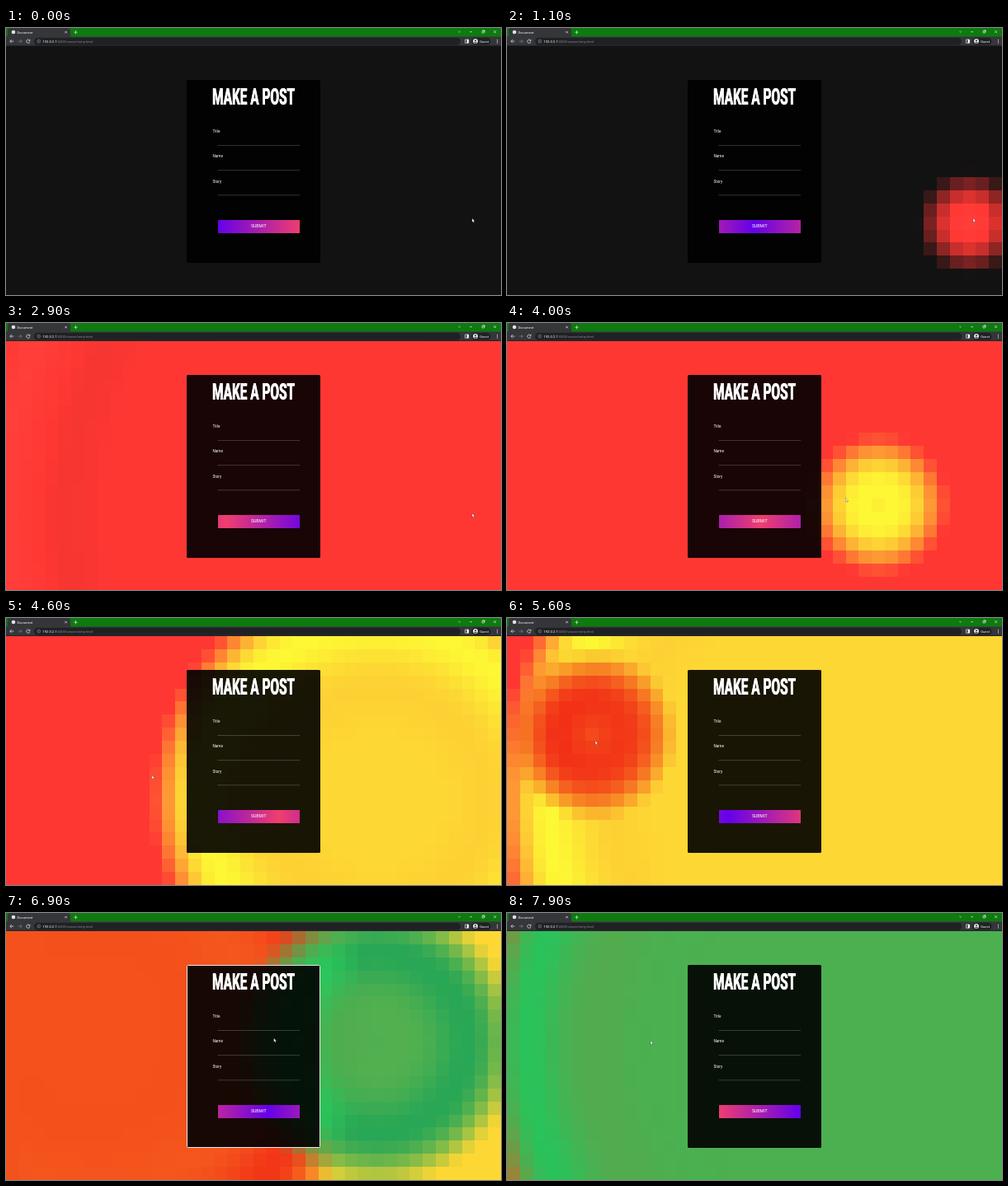
An HTML page with a canvas for the animation above (8000 ms loop, 600 px wide and 324 px high).

```html
<!DOCTYPE html>
<html lang="en">
<head>
<meta charset="utf-8">
<title>Document</title>
<style>
  html, body { margin: 0; width: 100%; height: 100%; overflow: hidden; background: #131213; }
  .stage { position: relative; width: 600px; height: 324px; overflow: hidden; font-family: Roboto, "Liberation Sans", sans-serif; }
  .stage > * { position: absolute; left: 0; top: 0; }
  .stage > .form {
    left: 219px; top: 62.5px; width: 162px; height: 222px; box-sizing: border-box;
    border-radius: 1.5px; background: rgb(0 0 0 / .9);
  }
  .form.hover { border: 1px solid #e8e8e8; }
  .stage > h1 {
    left: 250.1px; top: 70.4px; margin: 0; color: #fff;
    font-size: 28px; font-weight: 700; line-height: 1; white-space: nowrap;
    transform: scaleX(.55); transform-origin: 0 0;
    text-shadow: .6px 0 #fff, -.6px 0 #fff;
  }
  .stage > .submit {
    left: 256.5px; top: 233px; width: 99.5px; height: 15.5px; border-radius: .5px;
    background: linear-gradient(90deg, #6600ea, #f03e6e, #6600ea) 0 0 / 200px 100%;
    color: #fff; font-size: 5.2px; line-height: 15.5px; text-align: center;
  }
  svg { font-size: 4.7px; }
  .fine { font-size: 4.1px; }
  .line { fill: none; stroke: #e4e5e7; stroke-width: .7; }
</style>
</head>
<body>
<div class="stage">
  <canvas width="600" height="324"></canvas>
  <div class="form"></div>
  <h1>MAKE A POST</h1>
  <div class="submit">SUBMIT</div>
  <svg width="600" height="324" viewBox="0 0 600 324" fill="#fff">
    <!-- browser bar -->
    <rect width="600" height="11" fill="#0e7a10"/>
    <path d="M0 11Q2 11 2 9V3Q2 0 5 0H75Q78 0 78 3V9Q78 11 80 11Z" fill="#35363a"/>
    <rect y="10.5" width="600" height="11" fill="#35363a"/>
    <rect y="21.3" width="600" height=".7" fill="#222326"/>
    <rect x="34" y="11.7" width="517" height="9" rx="4.5" fill="#202124"/>
    <circle cx="9" cy="5" r="2.3" fill="#dfe1e5"/>
    <path class="line" d="M71.4 3.9l2.4 2.4m0-2.4l-2.4 2.4M82.4 5.2h4.2m-2.1-2.1v4.2"/>
    <path class="line" d="M548.4 4l1.2 1.2L550.8 4M562 4.7h3M577 3.6h2.4V6H577zM578 3.6v-.8h2.2V5h-.8M591.2 3.2l2.8 2.8m0-2.8l-2.8 2.8"/>
    <path class="line" d="M9.4 16.1H4.8m2.1-2.1l-2.1 2.1 2.1 2.1"/>
    <path class="line" stroke-opacity=".4" d="M14.6 16.1h4.6m-2.1-2.1l2.1 2.1-2.1 2.1"/>
    <path class="line" d="M28.4 14.8a2.1 2.1 0 1 0 .5 1.7M29 13.8v1.6h-1.7"/>
    <circle cx="39.8" cy="16.1" r="1.9" class="line" style="stroke-width:.5;stroke:#9aa0a6"/>
    <path d="M39.5 15.7h.6v1.5h-.6zM39.5 14.8h.6v.5h-.6z" fill="#9aa0a6"/>
    <path class="line" d="M556.6 14h4v4.2h-4z"/>
    <rect x="558.7" y="14" width="2" height="4.2"/>
    <rect x="564.5" y="11.8" width="23" height="8.8" rx="4.4" fill="#202124"/>
    <circle cx="569" cy="16.1" r="3" fill="#dfe1e5"/>
    <circle cx="569" cy="15.3" r="1" fill="#35363a"/>
    <path d="M567 17.8q2-1.6 4 0-2 1.4-4 0" fill="#35363a"/>
    <path d="M595 13.9h1v1h-1zM595 15.7h1v1h-1zM595 17.5h1v1h-1z" fill="#dfe1e5"/>
    <g class="fine">
      <text x="13.5" y="6.6">Document</text>
      <text x="44.5" y="17.6">192.0.2.7<tspan fill="#85898f">:4300/viewer/entry.html</tspan></text>
      <text x="574.3" y="17.6">Guest</text>
    </g>

    <!-- form fields -->
    <text x="250.4" y="127.2">Title</text>
    <text x="250.4" y="157.4">Name</text>
    <text x="250.4" y="187.6">Story</text>
    <path d="M256.5 142.5h99.5M256.5 172.6h99.5M256.5 202.8h99.5" stroke="#fff" stroke-opacity=".24" stroke-width=".8"/>

    <path id="cursor" d="M0 0V4.5L1 3.6 1.7 5.2 2.5 4.8 1.8 3.3 3.2 3.2Z" stroke="#222" stroke-width=".3"/>
  </svg>
</div>
<script>
  const LOOP = 8000, COLS = 38, ROWS = 19, TOP = 22, STEP = 50, SPRING = 1000;
  const DARK = [19, 18, 19];

  // hold: when the previous wave freezes; at: when this one starts to spread
  const waves = [
    { hold: 900, at: 900, col: 35, row: 13, rgb: [255, 55, 51] },
    { hold: 3730, at: 3730, col: 28, row: 12, rgb: [253, 215, 52] },
    { hold: 5200, at: 5270, col: 6, row: 7, rgb: [244, 81, 28] },
    { hold: 6350, at: 6350, col: 28, row: 8, rgb: [76, 175, 80] }
  ];

  // time, x, y
  const path = [
    [0, 565, 231], [3000, 565, 231], [3500, 450, 216], [3900, 450, 216],
    [4600, 177, 191], [5050, 107, 149], [5700, 107, 149], [6250, 450, 153],
    [6550, 450, 153], [6900, 325, 152], [7300, 174, 155], [LOOP, 174, 155]
  ];

  const ctx = document.querySelector("canvas").getContext("2d");
  const form = document.querySelector(".form");
  const submit = document.querySelector(".submit");
  const cursor = document.getElementById("cursor");

  const elastic = p => p <= 0 ? 0 : p >= 1 ? 1 : 1 - 2 ** (-10 * p) * Math.cos(4 * Math.PI * p);
  const mix = (a, b, k) => a.map((v, i) => Math.max(0, Math.min(255, v + (b[i] - v) * k)));
  const edgeX = col => Math.round(col * 600 / COLS);
  const edgeY = row => TOP + Math.round(row * (324 - TOP) / ROWS);

  function tint(col, row, t) {
    return waves.reduce((rgb, w, i) => {
      const end = Math.min(t, waves[i + 1]?.hold ?? LOOP);
      const age = end - w.at - STEP * Math.hypot(col - w.col, row - w.row);
      return age > 0 ? mix(rgb, w.rgb, elastic(age / SPRING)) : rgb;
    }, DARK);
  }

  function drawTiles(t) {
    for (let row = 0; row < ROWS; row++) {
      for (let col = 0; col < COLS; col++) {
        const x = edgeX(col), y = edgeY(row);
        ctx.fillStyle = `rgb(${tint(col, row, t).map(Math.round)})`;
        ctx.fillRect(x, y, edgeX(col + 1) - x, edgeY(row + 1) - y);
      }
    }
  }

  function pointer(t) {
    const i = path.findIndex(p => p[0] > t);
    const [t0, x0, y0] = path[i - 1], [t1, x1, y1] = path[i];
    const k = (t - t0) / (t1 - t0);
    return [x0 + (x1 - x0) * k, y0 + (y1 - y0) * k];
  }

  function render(t) {
    drawTiles(t);
    const [x, y] = pointer(t);
    cursor.setAttribute("transform", `translate(${x} ${y})`);
    form.classList.toggle("hover", x > 219 && x < 381 && y > 62 && y < 285);
    submit.style.backgroundPositionX = t / 26.5 + "px";
  }

  const start = performance.now();
  function tick() {
    render((performance.now() - start) % LOOP);
    requestAnimationFrame(tick);
  }
  tick();
</script>
</body>
</html>
```
